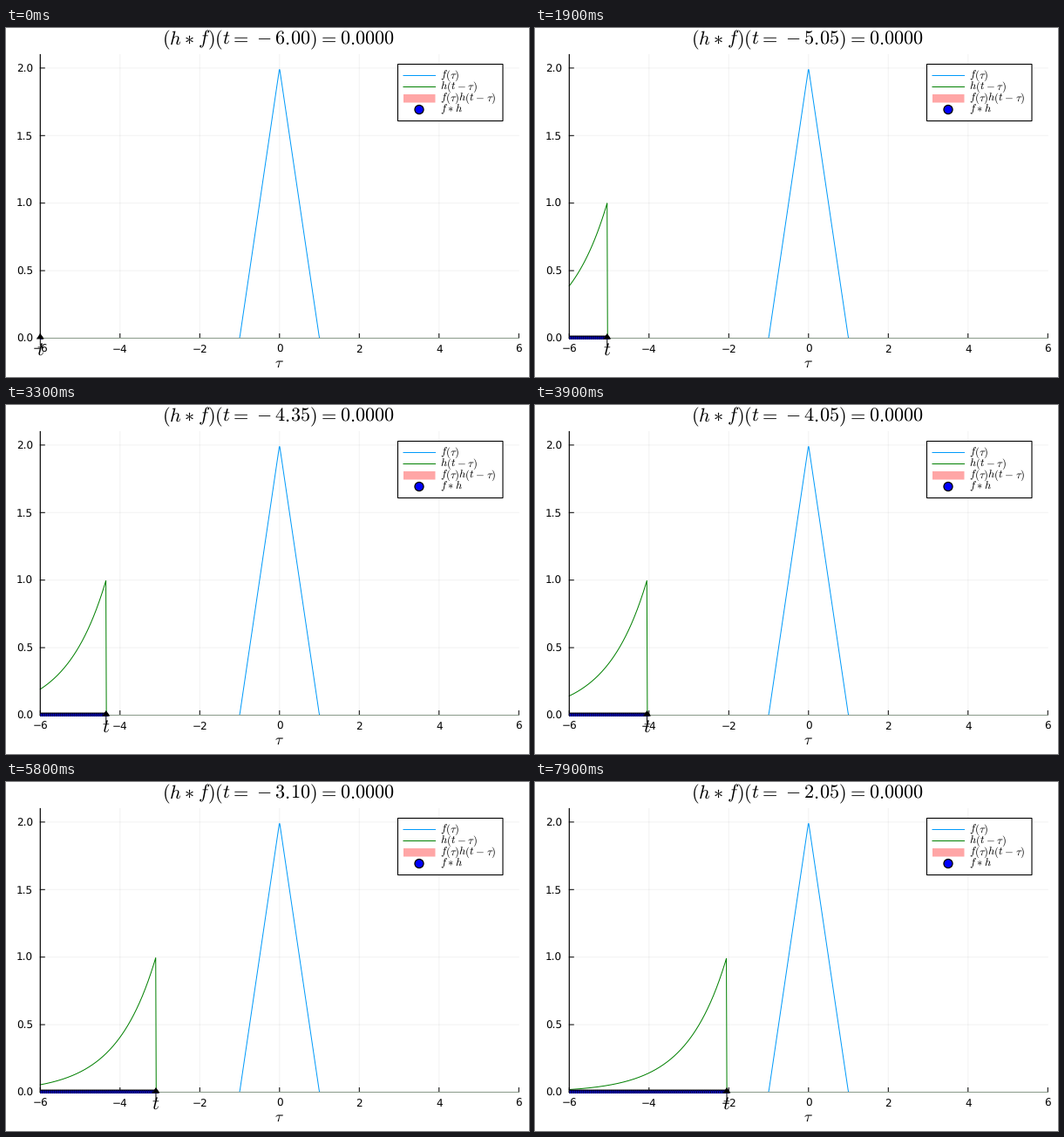
A matplotlib script that plays this animation: 600 px wide and 400 px high, repeating every 8 s.

```python
import numpy as np
import matplotlib.pyplot as plt
from matplotlib.animation import FuncAnimation
from matplotlib.patches import Circle, Rectangle

plt.rcParams.update({
    "mathtext.fontset": "cm",
    "font.family": "DejaVu Sans",
    "text.hinting": "none",
    "path.snap": False,
})

W, H, DPI = 600, 400, 100
PT = 72 / DPI  # points per pixel
FRAMES, INTERVAL, STEP = 80, 100, 0.05
LEFT, RIGHT, TOP, BASE = 39.3, 588.3, 30.5, 355.5
BLUE, GREEN = "#009afa", "#008000"


def px(x):
    return LEFT + (x + 6) * (RIGHT - LEFT) / 12


def py(y):
    return BASE - 154.8 * y


fig = plt.figure(figsize=(W / DPI, H / DPI), dpi=DPI, facecolor="white")
ax = fig.add_axes([0, 0, 1, 1])
ax.set_xlim(0, W)
ax.set_ylim(H, 0)
ax.axis("off")
plot_area = Rectangle((39, 30), 550, 327, transform=ax.transData)


def line(x, y, color="black", width=1.0, **kw):
    return ax.plot(x, y, color=color, lw=width * PT, **kw)[0]


def label(x, y, s, size, ha="center", **kw):
    return ax.text(x, y, s, fontsize=size * PT, ha=ha, va="baseline", **kw)


def dot(x, y, r, edge, z):
    return ax.add_patch(Circle((x, y), r, fc="blue", ec="black",
                               lw=edge * PT, zorder=z))


def tex(s):
    """Math text with slightly wider operator spacing."""
    pad = r"\hspace{0.03}"
    for op in ("=", "-", r"\ast"):
        s = s.replace(op, pad + op + pad)
    return f"${s}$"


# Grid, axes and tick labels
for v in range(-6, 7, 2):
    x = px(v)
    if abs(v) < 6:
        line([x, x], [TOP, BASE], alpha=0.05, zorder=1)
    line([x, x], [BASE, BASE - 5], zorder=4)
    label(x, 372, str(v).replace("-", "\u2212"), 12, zorder=5)
for v in np.arange(0, 2.1, 0.5):
    y = py(v)
    if v:
        line([LEFT, RIGHT], [y, y], alpha=0.05, zorder=1)
    line([LEFT, LEFT + 5], [y, y], zorder=4)
    label(31, y + 4.6, f"{v:.1f}", 12, ha="right", zorder=5)
line([LEFT, LEFT], [TOP, BASE], width=1.2, zorder=4)
line([LEFT, RIGHT], [BASE, BASE], "#8a9a8a", zorder=4)
label(313.5, 389, r"$\tau$", 17.4)

# Curves
tau = np.linspace(-6, 6, 1000)
bump = abs(tau) < 1.01
line(px(tau[bump]), py(np.maximum(0, 2 - 2 * abs(tau[bump]))), BLUE, zorder=2)
h_line = line([], [], GREEN, zorder=3)
trail = [dot(px(-6 + STEP * k), BASE, 2.5, 1, 6) for k in range(FRAMES)]
for d in trail:
    d.set_clip_path(plot_area)

# Legend
ax.add_patch(Rectangle((449.5, 41.5), 120.5, 65, fc="white", ec="black",
                       lw=1.1 * PT, zorder=7))
entries = [r"f(\tau)", r"h(t-\tau)", r"f(\tau)h(t-\tau)", r"f\ast h"]
for i, s in enumerate(entries):
    label(498, 57.5 + 13 * i, tex(s), 12.65, ha="left", zorder=8)
line([456, 492.5], [54.5, 54.5], BLUE, zorder=8)
line([456, 492.5], [67.5, 67.5], GREEN, zorder=8)
ax.add_patch(Rectangle((456, 76), 36.5, 9.5, fc="#ffa6a6", lw=0, zorder=8))
dot(474, 93.5, 5, 1.3, 8)

# Title and moving time pointer
title = label(312.3, 19, "", 22.2)
stem = line([], [], zorder=9)
head = ax.fill([0, 0, 0], [0, 0, 0], color="black", lw=0, zorder=9)[0]
t_label = label(0, 375.7, "$t$", 22.2, zorder=9)


def update(i):
    t = -6 + STEP * i
    x = px(t)
    n = np.count_nonzero(tau < t)
    h = np.append(np.exp(tau[:n] - t), 0)
    h_line.set_data(px(tau[:n + 1]), py(h))
    for k, d in enumerate(trail):
        d.set_visible(k <= i)
    stem.set_data([x, x], [BASE, 364])
    head.set_xy([(x, 350), (x + 4.5, 356.5), (x - 4.5, 356.5)])
    t_label.set_x(x)
    title.set_text(tex(rf"(h\ast f)(t=-{-t:.2f})=0.0000"))
    return h_line, *trail, stem, head, t_label, title


anim = FuncAnimation(fig, update, frames=FRAMES, interval=INTERVAL,
                     repeat=True, repeat_delay=0, blit=False)
plt.show()
```
